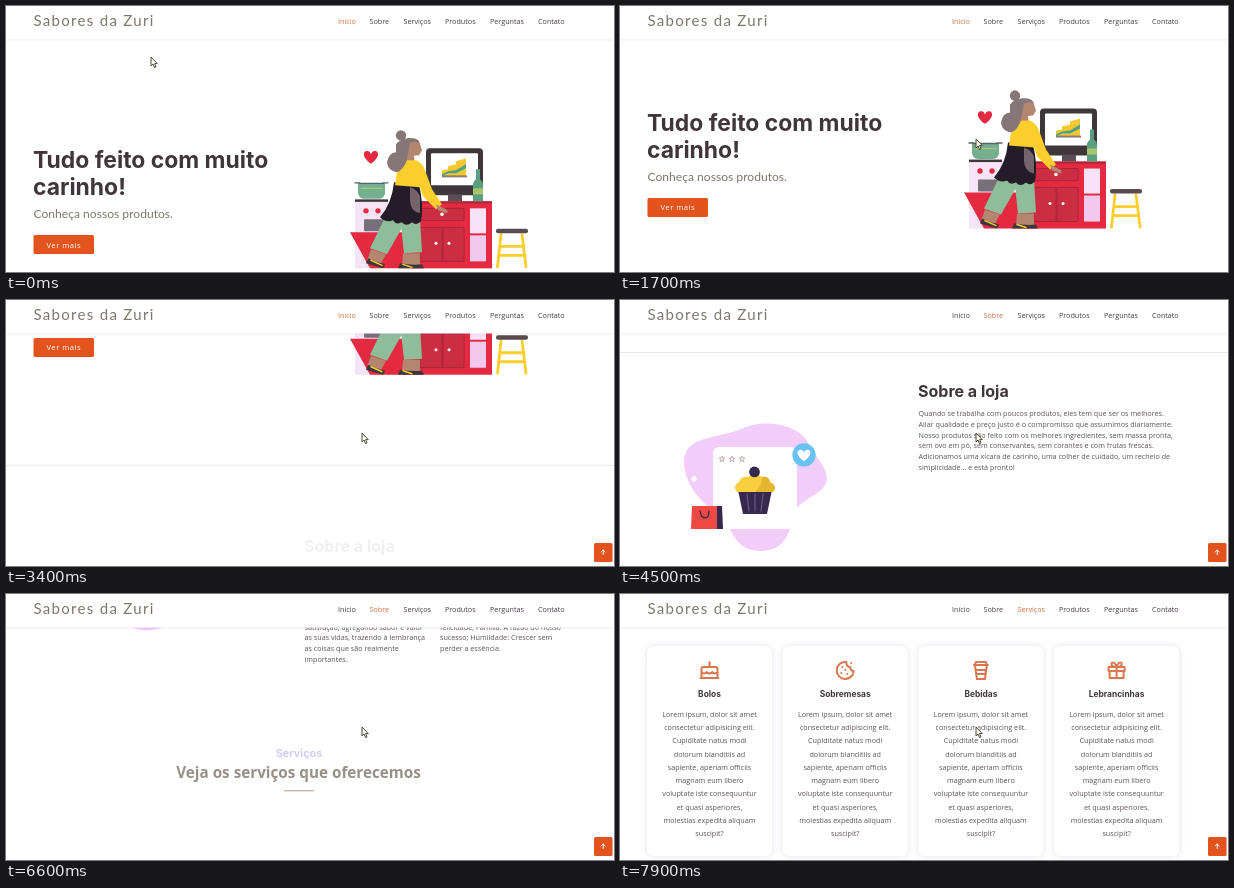
Write an HTML page that moves like this. It is 608 px wide and 266 px high and loops after 8 s.

```html
<!DOCTYPE html>
<html lang="pt">
<head>
<meta charset="utf-8">
<style>
  html, body { margin: 0; width: 100%; height: 100%; overflow: hidden; background: #fff; }
  svg { display: block; width: 608px; height: 266px; }
  text { font: 7.2px "Open Sans", sans-serif; fill: #5c5258; white-space: pre; }
  .head { font-family: Inter, sans-serif; font-weight: 700; fill: #40353a; }
  .thin { font-family: Lato, sans-serif; fill: #7f766c; }
  .nav { fill: #443b45; }
  .nav.on { fill: #d2713f; }
  .mid { text-anchor: middle; }
  .line { fill: none; stroke: #d9774f; stroke-width: 2; stroke-linejoin: round; stroke-linecap: round; }
  .card { fill: #fff; filter: drop-shadow(0 0 3px rgba(110, 50, 150, .16)); }
</style>
</head>
<body>
<svg id="stage" viewBox="0 0 608 266"></svg>
<script>
const LOOP = 8000, HEART = "M0 6C-10-1-7-7-3-6Q-1-6 0-3Q1-6 3-6C7-7 10-1 0 6Z";

const text = (x, y, str, cls = "", size = 0, extra = "") =>
  `<text x="${x}" y="${y}" class="${cls}" style="${size ? `font-size:${size}px;` : ""}${extra}">${str}</text>`;
const lines = (x, y, gap, str, cls) =>
  str.split("|").map((s, i) => text(x, y + i * gap, s, cls)).join("");
const rect = (x, y, w, h, fill, r = 0, more = "") =>
  `<rect x="${x}" y="${y}" width="${w}" height="${h}" rx="${r}" fill="${fill}" ${more}/>`;
const dot = (x, y, r, fill) => `<circle cx="${x}" cy="${y}" r="${r}" fill="${fill}"/>`;
const path = (d, fill, more = "") => `<path d="${d}" fill="${fill}" ${more}/>`;
const stroke = (d, color, w) => path(d, "none", `stroke="${color}" stroke-width="${w}" stroke-linecap="round"`);
const at = (x, y, body, s = 1) => `<g transform="translate(${x} ${y}) scale(${s})">${body}</g>`;
const reveal = (start, body) => `<g data-start="${start}">${body}</g>`;

const kitchen = () => {
  const red = "#e32a40", deep = "#a92438", dark = "#3f363c", skin = "#b48670", hair = "#857777", yellow = "#fbcd2d";
  return at(365, 151, path(HEART, red), 1.05)
    // stove and pot
    + rect(349, 195, 34, 67, "#f5e3f6") + rect(349, 193, 33, 2.5, dark)
    + dot(360, 204.5, 2.7, red) + dot(372, 204.5, 2.7, red) + rect(358, 213, 20, 12, "#77707a", 1)
    + path("M344 226H400L414 262H364Z", red)
    + path("M352 177H379V187Q378 192.500 372 192.500H359Q353 192.500 352 187Z", "#76ae90")
    + stroke("M349 176.500H354M377 176.500H382M353 177H378", "#58636b", 1.4) + stroke("M355 182H376", "#a9c77a", 1.2)
    // monitor
    + rect(420, 142, 57, 47, dark, 4) + rect(425, 147, 47, 32, "#fff", 1)
    + path("M436 170V164L442 163V160L450 158V155L460 152V170Z", "#f5c82f")
    + path("M436 168L442 165L450 164L460 158V162L450 167H442L436 170Z", "#4aa386")
    + rect(436, 169, 25, 2, "#8a7a70") + rect(442, 188, 14, 7, "#594d56")
    // cabinet
    + rect(405, 195, 81, 67, red) + rect(405, 195, 81, 2, deep)
    + [[415, 202, 43, 12], [414, 221, 22, 34], [437, 221, 21, 34]].map(([x, y, w, h]) =>
        rect(x, y, w, h, "#cb2e42", 0, `stroke="${deep}"`)).join("")
    + dot(436, 208, 1.8, "#fff") + dot(430, 237, 1.5, "#fff") + dot(443, 237, 1.5, "#fff")
    + rect(464, 202, 16, 25, "#f9e2f7") + rect(464, 229, 16, 26, "#f3c8ee")
    + path("M470 163H474V173Q478 176 477 181V195H467V181Q466 176 470 173Z", "#5a9f80") + rect(467, 182, 10, 6, "#a5c66a")
    // stool
    + stroke("M495 228L491.500 260.500M516 228L520 260.500M494 240H518M493 249H519", yellow, 2.8)
    + rect(490, 222.5, 32, 4.5, "#594c4e", 2)
    // woman
    + path("M381 207L402 211L381 248L364 242Z", "#8fbd9a") + path("M394 210L414 213L416 246L398 247Z", "#8fbd9a")
    + path("M365 243L380 248L374 259L361 254Z", skin) + path("M397 247H414V260H396Z", skin)
    + path("M362 252Q370 256 379 258L377 262L360 257Z", dark) + path("M394 257Q406 259 416 258L418 262H392Z", dark)
    + stroke("M365 254L376 259M397 258L406 261", yellow, 1.5)
    + path("M388 176L413 178Q418 199 415 215Q410 220 406 216Q400 221 396 216Q390 219 387 214Q380 217 374 211Q386 197 388 176Z", "#241d28")
    + dot(395, 129, 5.2, hair) + path("M390 138Q396 130 408 132Q416 134 413 141L402 150Q404 164 394 166Q382 166 381 156Q383 146 390 146Z", hair)
    + path("M404 137Q412 133 414.500 139L416 144L413 149L408 149.500L409 158L400 157Z", skin)
    + path("M401 154L410 154Q416 156 419 164L426 183L436 198L430 203L417 190L414 181L389 179L391 166Q397 164 401 154Z", yellow)
    + path("M404 181Q411 183 414 190L414 207Q404 205 404 194Z", "#75646b")
    + path("M430 198L438 202Q443 204 441 207L432 204Z", skin);
};

const shop = () => {
  const navy = "#36294e";
  const star = "M0-3L1-1L3-1L1.500.500L2 3L0 1.500L-2 3L-1.500.500L-3-1L-1-1Z";
  return path("M64 88C63 60 98 64 121 54C145 43 177 50 187 66C192 79 207 90 207 104C206 118 187 121 177 133C169 148 172 176 140 176C110 175 113 147 96 138C84 129 65 112 64 88Z", "#f2cdfa")
    + dot(74, 104, 2.6, "#fff") + rect(93, 72, 84, 82, "#fff", 6)
    + [102, 112, 122].map(x => at(x, 84, path(star, "#eee2ef", 'stroke="#b8aa9c" stroke-width=".8"'))).join("")
    + path("M118 115H152L147 139H123Z", navy) + stroke("M127 119L129 136M135 119V136M143 119L141 136", "#67558a", 1.2)
    + path("M117 117Q112 111 119 107Q121 101 128 102Q135 95 142 102Q149 101 150 107Q158 111 153 117Z", "#f8cf3f")
    + path("M135 117Q142 111 142 102Q149 101 150 107Q158 111 153 117Z", "#e4b52f")
    + dot(134.5, 97, 5.4, navy)
    + dot(184, 80, 11.6, "#68c3f2") + at(184, 80.500, path(HEART, "#fff"), .95)
    + path("M72 131H98V154H71Z", "#ee4a43") + path("M97 131H102L103 154H97Z", navy)
    + stroke("M80 136Q81 143 85 143Q89 143 89 136", navy, 1.3);
};

const icon = (d) => `<path class="line" d="${d}"/>`;
const cards = [
  ["Bolos", "M-8 8H8V-1Q8-3 6-3H-6Q-8-3-8-1ZM-8 2Q-5 5-3 2Q0 5 3 2Q5 5 8 2M0-3V-8M-9 8H9"],
  ["Sobremesas", "M1-8A8.500 8.500 0 1 0 8.500 1Q5 1 5-3Q1-3 1-8ZM-3-3V-2.900M-4 3V3.100M2 4V4.100M0 0V.1M6-7V-6.900"],
  ["Bebidas", "M-7-5H7M-5-8H5L6-5H-6ZM-6-5L-4 9H4L6-5M-5 0H5L4.500 4H-4.500"],
  ["Lebrancinhas", "M-8-3H8V1H-8ZM-7 1V8H7V1M0-3V8M0-3Q-6-3-5-7Q-2-9 0-3Q2-9 5-7Q6-3 0-3"]
];
const lorem = "Lorem ipsum, dolor sit amet|consectetur adipisicing elit.|Cupiditate natus modi|dolorum blanditiis ad|sapiente, aperiam officiis|magnam eum libero|voluptate iste consequuntur|et quasi asperiores,|molestias expedita aliquam|suscipit?";

const hero = text(27, 162, "Tudo feito com muito", "head", 22.9) + text(27, 189, "carinho!", "head", 22.9)
  + text(27.5, 212, "Conheça nossos produtos.", "thin", 12.1)
  + rect(27.5, 229, 60.5, 19, "#e2531e", 1.5)
  + text(40.5, 241.5, "Ver mais", "", 7.7, "fill:#fff;letter-spacing:.45px")
  + `<g id="kitchen">${kitchen()}</g>`;

const about = rect(0, 356, 608, 1, "#e6e6ec")
  + reveal(3.4, `<g id="shop">${shop()}</g>`)
  + reveal(3.25, text(298, 401, "Sobre a loja", "head", 16)
    + lines(298.5, 420.2, 10.75, "Quando se trabalha com poucos produtos, eles tem que ser os melhores.|Aliar qualidade e preço justo é o compromisso que assumimos diariamente.|Nosso produtos são feito com os melhores ingredientes, sem massa pronta,|sem ovo em pó, sem conservantes, sem corantes e com frutas frescas.|Adicionamos uma xícara de carinho, uma colher de cuidado, um recheio de|simplicidade... e está pronto!"))
  + reveal(4.6, at(310, 503, icon("M-8-8H5V8H-6Q-8 8-8 6ZM5-2H9V6Q9 8 7 8H5M-4-4H1V0H-4ZM-4 4H1"))
    + text(298.5, 527.3, "Missão", "head", 9)
    + lines(298.5, 541.6, 10.75, "Oferecer às pessoas produtos de|qualidade, que garantam sua|satisfação, agregando sabor e valor|às suas vidas, trazendo à lembrança|as coisas que são realmente|importantes."))
  + reveal(4.7, at(445, 503, icon("M-9 1H-6V8H-9ZM-6 2H-1L2 4H-1M2 4L8 2Q10 4 8 5L1 8L-6 7M3-1L-1-5Q-1-9 3-7Q7-9 7-5Z"))
    + text(434, 527.3, "Valores", "head", 9)
    + lines(434, 541.6, 10.75, "Simplicidade: Optar pelo simples é|escolher um caminho para a|felicidade; Família: A razão do nosso|sucesso; Humildade: Crescer sem|perder a essência."));

const services = reveal(6.05,
    text(293, 673.5, "Serviços", "head mid", 11, "fill:#b0a4ec;font-weight:600")
    + text(292.5, 694.8, "Veja os serviços que oferecemos", "mid", 15.25, "font-weight:700;fill:#5a4c3e")
    + rect(278, 706.5, 30, 1.2, "#a07850"))
  + cards.map(([name, d], i) => {
      const x = 89.5 + i * 135.7;
      return reveal(6.7 + i * .08, `<rect class="card" x="${x - 62.5}" y="738" width="125" height="210" rx="6"/>`
        + at(x, 762, icon(d)) + text(x, 789.2, name, "head mid", 8.4) + lines(x, 808.8, 13.28, lorem, "mid"));
    }).join("");

const menu = [[332, "Início"], [363.5, "Sobre"], [397.5, "Serviços"], [439, "Produtos"], [484, "Perguntas"], [532, "Contato"]];
const header = rect(0, 0, 608, 33.5, "#fff", 0, 'style="filter:drop-shadow(0 0 1.5px rgba(130,80,180,.22))"')
  + text(27.5, 20.2, "Sabores da Zuri", "thin", 15, "letter-spacing:1.3px")
  + menu.map(([x, s]) => text(x, 18.2, s, "nav")).join("");

const stage = document.getElementById("stage");
stage.innerHTML = `<g id="page">${hero}${about}${services}</g>${header}
  <g id="top">${rect(588, 243, 18.5, 19, "#e2531e", 1.5)}${stroke("M597.200 254.500V250M595.200 252L597.200 250L599.200 252", "#fff", 1)}</g>
  <g id="cursor">${path("M0 0V9L2 7L3.500 10.500L5 10L3.600 6.600H6.300Z", "#fffbe8", 'stroke="#40372f" stroke-width=".9"')}</g>`;

const $ = id => document.getElementById(id);
const move = (el, x, y) => el.setAttribute("transform", `translate(${x} ${y})`);
const clamp = v => Math.max(0, Math.min(1, v));
const smooth = v => (v = clamp(v), v * v * (3 - 2 * v));
const bob = (t, peak) => 4.5 * Math.cos((t - peak) * Math.PI / 2);
const reveals = [...document.querySelectorAll("[data-start]")];
const links = [...document.querySelectorAll(".nav")];

// seconds, scroll offset
const stops = [[0, 0], [1.3, 0], [1.7, 37], [3.4, 191], [4.5, 304], [5.7, 385], [6.6, 527.4], [7.9, 686], [8, 686]];
function scrollAt(t) {
  const i = stops.findIndex(s => s[0] > t), [t0, y0] = stops[i - 1], [t1, y1] = stops[i];
  return y0 + (y1 - y0) * (t - t0) / (t1 - t0);
}

function draw(now) {
  const t = (now % LOOP) / 1000, y = scrollAt(t), m = smooth((t - .15) / 1.05);
  move($("page"), 0, -y);
  move($("kitchen"), 0, bob(t, 3.05));
  move($("shop"), 0, 383.5 + bob(t, 6.55));
  move($("cursor"), 145 + 211 * m, 51 + 82 * m);
  for (const g of reveals) {
    const p = smooth((t - g.dataset.start) / .95);
    g.setAttribute("opacity", p);
    move(g, 0, 45 * (1 - p));
  }
  $("top").setAttribute("opacity", clamp((y - 45) / 25));
  const active = y > 550 ? 2 : y > 266 ? 1 : 0;
  links.forEach((a, i) => a.classList.toggle("on", i === active));
}

const began = performance.now();
function tick() {
  draw(performance.now() - began);
  requestAnimationFrame(tick);
}
tick();
</script>
</body>
</html>
```
